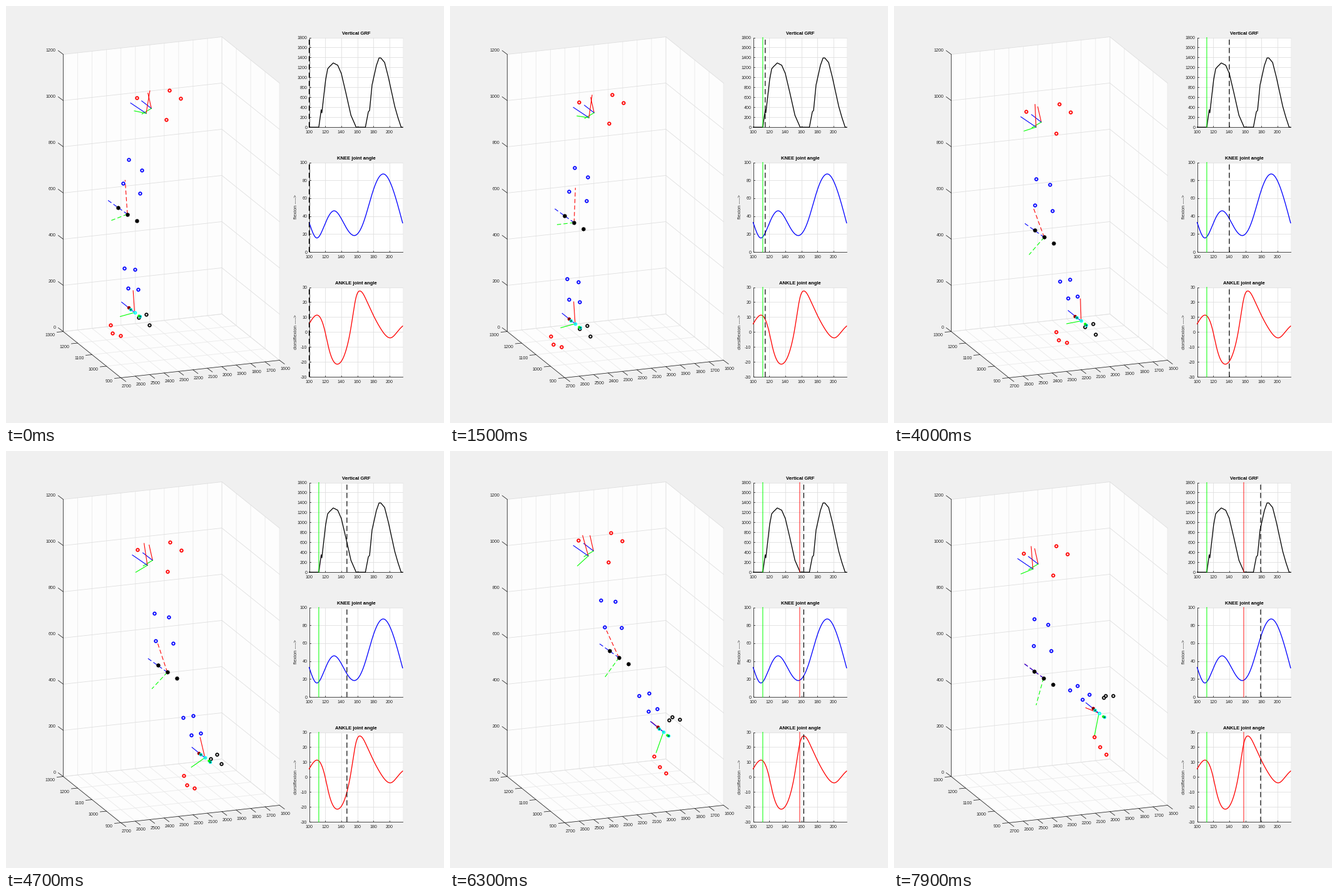
A matplotlib script for the animation above (8 s loop, 700 by 668 pixels).

```python
import numpy as np
import matplotlib.pyplot as plt
from matplotlib.animation import FuncAnimation

W, H, DPI = 700, 668, 100
FRAMES, STEP_MS, FIRST = 80, 100, 100
PT = 72 / DPI  # points per pixel
INK, GRID, FAINT = "#262626", "#dedede", "#e8e8e8"
RED, BLUE, GREEN, CYAN = "#ff0000", "#0000ff", "#00ff00", "#00ffff"

plt.rcParams["font.family"] = "Liberation Sans"
fig = plt.figure(figsize=(W / DPI, H / DPI), dpi=DPI, facecolor="#f0f0f0")
ax = fig.add_axes([0, 0, 1, 1])
ax.set(xlim=(0, W), ylim=(H, 0))
ax.axis("off")


def spline(t, y, s):
    """Natural cubic spline through (t, y) at s; y may be complex."""
    t, y = np.asarray(t, float), np.asarray(y)
    h, n = np.diff(t), len(t)
    slope = np.diff(y) / h
    a, r = np.eye(n), np.zeros(n, slope.dtype)
    for i in range(1, n - 1):
        a[i, i - 1:i + 2] = h[i - 1], 2 * (h[i - 1] + h[i]), h[i]
        r[i] = 6 * (slope[i] - slope[i - 1])
    m = np.linalg.solve(a, r)
    i = np.clip(np.searchsorted(t, s, "right") - 1, 0, n - 2)
    p, q, d = t[i + 1] - s, s - t[i], h[i]
    return ((m[i] * p**3 + m[i + 1] * q**3) / (6 * d)
            + (y[i] / d - m[i] * d / 6) * p + (y[i + 1] / d - m[i + 1] * d / 6) * q)


def line(xs, ys, color=INK, lw=1.0, **kw):
    return ax.plot(xs, ys, color=color, lw=lw * PT, **kw)[0]


def label(x, y, s, size=7.1, ha="center", va="center_baseline", color=INK, **kw):
    ax.text(x, y, s, fontsize=size * PT, ha=ha, va=va, color=color, **kw)


# ---- 3D box: screen vectors for 100 mm along each axis ----
CORNER = 91.5 + 521.5j
UX, UY, UZ = 23.05 - 2.55j, 23 + 18.5j, -37j
NX, NY, NZ = 11, 4, 12


def path(*points, color=FAINT, close=False):
    p = np.array([CORNER + x * UX + y * UY + z * UZ for x, y, z in points])
    if close:
        ax.fill(p.real, p.imag, color="#fdfdfd", lw=0)
    else:
        line(p.real, p.imag, color, 0.8)


def tick(p, step, text, shift, ha):
    line([p.real, (p + step).real], [p.imag, (p + step).imag], lw=0.8)
    label((p + shift).real, (p + shift).imag, text, 7.2, ha)


def draw_box():
    path((0, 0, 0), (NX, 0, 0), (NX, 0, NZ), (0, 0, NZ), close=True)
    path((NX, 0, 0), (NX, NY, 0), (NX, NY, NZ), (NX, 0, NZ), close=True)
    path((0, 0, 0), (NX, 0, 0), (NX, NY, 0), (0, NY, 0), close=True)
    for x in range(NX + 1):
        path((x, 0, NZ), (x, 0, 0), (x, NY, 0))
    for y in range(NY + 1):
        path((NX, y, NZ), (NX, y, 0), (0, y, 0))
    for z in range(0, NZ + 1, 2):
        path((0, 0, z), (NX, 0, z), (NX, NY, z), color=GRID)
        tick(CORNER + z * UZ, -8 - 6j, str(100 * z), -12 - 7j, "right")
    path((0, 0, NZ), (0, 0, 0), (0, NY, 0), (NX, NY, 0), color=INK)
    for y in range(NY + 1):
        tick(CORNER + y * UY, -10 + 1j, str(1300 - 100 * y), -13 + 5j, "right")
    for x in range(NX + 1):
        tick(CORNER + NY * UY + x * UX, 8 + 6j, str(2700 - 100 * x), 9 + 13j, "center")


# ---- graphs ----
LEFT, RIGHT, TALL = 484.5, 634, 143.7


def sx(s):
    return LEFT + 1.284 * (np.asarray(s) - FIRST)


class Graph:
    def __init__(self, top, lo, hi, step, title, ylabel=""):
        self.top, self.base = top, top + TALL
        self.lo, self.scale = lo, TALL / (hi - lo)
        ax.fill([LEFT, RIGHT, RIGHT, LEFT], [top, top, self.base, self.base], color="white", lw=0)
        for s in range(100, 201, 20):
            x = sx(s)
            line([x, x], [top, self.base], GRID, 0.8)
            line([x, x], [self.base, self.base - 2], lw=0.8)
            label(x, self.base + 7.5, str(s))
        for v in range(lo, hi + 1, step):
            y = self.y(v)
            line([LEFT, RIGHT], [y, y], GRID, 0.8)
            line([LEFT, LEFT + 2], [y, y], lw=0.8)
            label(LEFT - 3, y, str(v), ha="right")
        line([LEFT, LEFT, RIGHT], [top, self.base, self.base], lw=0.8)
        label(559.5, top - 6.5, title, 7.7, weight="bold", color="black")
        label(463.5, top + 71.5, ylabel, 7.7, rotation=90, va="center")

    def y(self, v):
        return self.base - (np.asarray(v) - self.lo) * self.scale

    def plot(self, s, v, color):
        line(sx(s), self.y(v), color, 1.3, solid_joinstyle="round")

    def cursor(self, s, color, lw, **kw):
        return line([sx(s)] * 2, [self.base, self.top], color, lw, snap=False, **kw)


draw_box()
force = Graph(50.5, 0, 1800, 200, "Vertical GRF")
knee_graph = Graph(250.5, 0, 100, 20, "KNEE joint angle", "flexion ---->")
ankle_graph = Graph(450.5, -30, 30, 10, "ANKLE joint angle", "dorsiflexion ---->")
graphs = force, knee_graph, ankle_graph

GRF = [(100, 0), (112, 0), (115, 350), (115.8, 290), (120.5, 950), (123, 1170), (125, 1210),
       (130, 1290), (135.5, 1245), (140, 1080), (145.7, 690), (152, 240), (158.5, 0), (170, 0),
       (173.6, 305), (175.2, 340), (178.3, 850), (183.7, 1240), (187, 1390), (189.2, 1390),
       (193.9, 1300), (198.5, 1010), (206.5, 420), (210.4, 200), (214.5, 0), (216.3, 0)]
FLEXION = [(100, 33), (109, 15.8), (120, 32), (131, 46), (145, 29), (157, 18.5), (168, 34),
           (180, 69.5), (193, 87), (205, 68), (216.3, 32.5)]
DORSIFLEXION = [(100, 5.5), (111, 11.2), (119, 2), (124.5, -11), (136.5, -21.3), (147, -10),
                (151.8, 2.3), (158.5, 23.5), (163, 27.5), (172.8, 19.4), (190, 1.5),
                (202.4, -3.7), (211.7, 1.5), (216.3, 4)]
fine = np.linspace(100, 216.3, 300)
force.plot(*np.transpose(GRF), "black")
knee_graph.plot(fine, spline(*np.transpose(FLEXION), fine), BLUE)
ankle_graph.plot(fine, spline(*np.transpose(DORSIFLEXION), fine), RED)

STRIKE, TOE_OFF = 112, 158
strike = [g.cursor(STRIKE, GREEN, 1) for g in graphs]
toe_off = [g.cursor(TOE_OFF, RED, 0.9) for g in graphs]
now = [g.cursor(FIRST, "black", 1.2, dashes=(7, 4), dash_capstyle="butt") for g in graphs]

# ---- leg: keyed joints and pitch angles, rigid segments between them ----
frames = np.arange(FRAMES)
KEYS = [0, 8, 15, 29, 40, 54, 71, 79]


def keyed(*values):
    return spline(KEYS, values, frames)


hip = keyed(224 + 172j, 223 + 171.5j, 222 + 179j, 226 + 200j,
            227 + 194j, 224 + 173j, 220 + 174j, 222 + 189j)
knee = keyed(194 + 333.5j, 193.5 + 338j, 198.3 + 347j, 212.5 + 370j,
             240 + 370.5j, 269.5 + 337j, 258.3 + 342j, 239 + 363.7j)
ankle = keyed(205.5 + 491j, 184 + 500j, 200 + 509j, 258.5 + 513.5j,
              299 + 504.5j, 331.5 + 474j, 339.5 + 432j, 327.5 + 420j)
thigh = keyed(-23, -24, -21, -15.5, -4, 12.5, 10, -1)
foot = keyed(6, 2, 6, -1, 3, 41, 68, 72)
shank = thigh + spline(*np.transpose(FLEXION), FIRST + frames) - 2


def body(origin, pitch, *points):
    """Screen paths of points (back, up, toward the viewer) on a pitching segment."""
    turn = np.exp(1j * np.radians(pitch))
    out = []
    for back, up, side in points:
        p = (back + 1j * up) * turn
        out.append(origin + p.real * UX + p.imag * UZ + side * UY)
    return np.array(out)


moving = []  # (artist, paths)


def markers(color, paths, size=4.5, edge=1.8, fill="none", shape="o"):
    dots = ax.plot([], [], ls="none", marker=shape, ms=size * PT, mec=color,
                   mew=edge * PT, mfc=fill, zorder=4)[0]
    moving.append((dots, paths))


def discs(color, paths, size=4.5):
    markers(color, paths, size, 1, color)


def stars(color, paths, size=4.5):
    markers(color, paths, size, 0.9, shape=(8, 2, 0))


def triad(origin, tips, **kw):
    for color, tip in zip((RED, BLUE, GREEN), tips):
        moving.append((line([], [], color, 1.1, zorder=3, **kw), np.array([origin, tip])))


# pelvis keeps its attitude, so plain screen offsets do
pelvis = hip + 8.3 - 8j
markers(RED, np.array([hip + d for d in (-15.5 - 25j, 36.5 - 37j, 54.5 - 24j, 32 + 9.5j)]))
triad(pelvis, [pelvis + d for d in (-5.5 - 24.5j, -15.5 - 12j, -15 + 9j)])

# thigh
triad(hip, body(hip, thigh, (-0.14, 0.98, 0), (0, -0.08, -1.05), (-0.82, -0.17, 0)))
cluster = body(knee, thigh, (0.4, 1.57, -0.56))[0]
markers(BLUE, body(cluster, thigh, (-0.18, 0.5, -0.37), (0.4, 0.45, 0.03),
                   (-0.44, -0.52, -0.12), (0.2, -0.46, 0.46)))

# knee and shank
triad(knee, body(knee, shank, (0.05, 1.5, 0), (-0.05, -0.05, -1.4), (-1.25, -0.04, 0)),
      dashes=(6, 3.5))
joint = np.array([knee, knee - 15 - 11j, knee + 15 + 10j])
discs("black", joint, 5)
stars("black", joint, 7)
cluster = body(knee + 0.66 * (ankle - knee), shank, (0.3, -0.26, -0.4))[0]
markers(BLUE, body(cluster, shank, (-0.19, 0.38, -0.25), (0.2, 0.43, 0.13),
                   (-0.2, -0.42, -0.1), (0.19, -0.38, 0.25)))

# foot
triad(ankle, body(ankle, foot, (0, 0.96, 0), (0, 0, -0.9), (-1, 0, 0)))
markers(RED, body(ankle, foot, (-1.19, -0.62, -0.57), (-1.42, -0.75, -0.2),
                  (-1.47, -0.54, 0.44)))
markers("black", body(ankle, foot, (0.83, -0.24, -0.03), (0.63, -0.53, -0.38),
                      (0.95, -0.7, 0.02)))
outer, near, inner, mark = (np.array([ankle + side * UY]) for side in (-0.42, -0.29, 0.35, 0.27))
discs(RED, outer)
stars("#700000", outer)
discs(CYAN, near)
discs(CYAN, inner)
markers(CYAN, ankle[None], 3.8)
discs(GREEN, mark, 3.2)
stars("#008060", near, 3)
stars("#008060", inner, 3)


def update(i):
    for artist, paths in moving:
        artist.set_data(paths[:, i].real, paths[:, i].imag)
    for g in range(3):
        now[g].set_xdata([sx(FIRST + i)] * 2)
        strike[g].set_visible(FIRST + i >= STRIKE)
        toe_off[g].set_visible(FIRST + i >= TOE_OFF)
    return []


anim = FuncAnimation(fig, update, frames=FRAMES, interval=STEP_MS, repeat=True,
                     repeat_delay=0, init_func=lambda: update(0))
plt.show()
```
